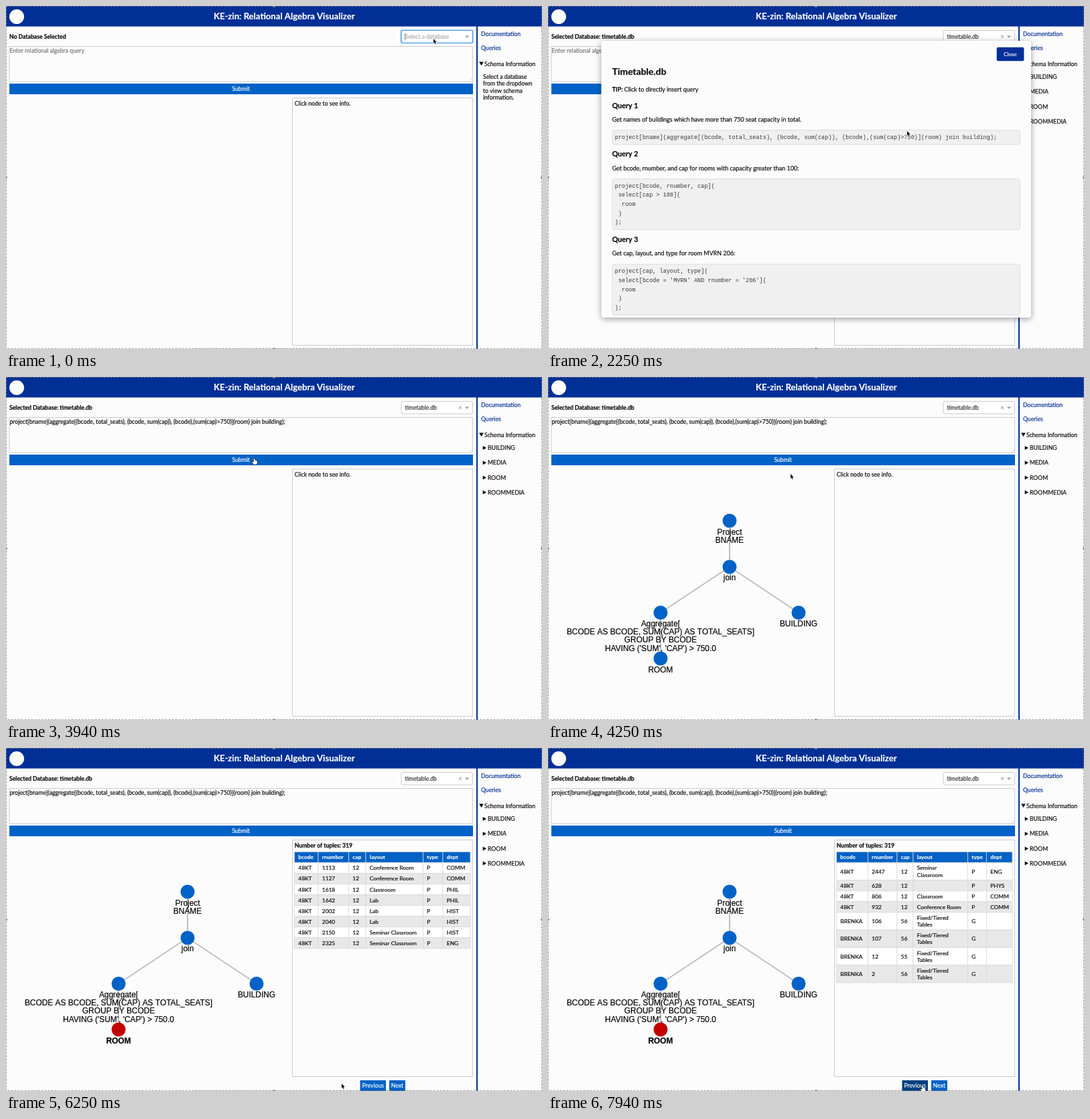
An HTML page with a canvas for the animation above (8000 ms loop, 800 px wide and 513 px high).

```html
<!DOCTYPE html>
<html lang="en">
<head>
<meta charset="utf-8">
<title>Relational Algebra Visualizer</title>
<style>
html, body { margin: 0; width: 100%; height: 100%; overflow: hidden; background: #fcfcfc; }
canvas { display: block; width: 800px; height: 513px; }
</style>
</head>
<body>
<canvas id="stage"></canvas>
<script>
const W = 800, H = 513, LOOP = 8000, STEP = 62.5;
const canvas = document.getElementById('stage');
const c = canvas.getContext('2d');
const ratio = window.devicePixelRatio || 1;
canvas.width = W * ratio;
canvas.height = H * ratio;

const NAVY = '#002f95', BLUE = '#0062c6', DARK = '#003f80', RED = '#c40000';
const PAGE = '#fcfcfc', LINE = '#cccccc', INK = '#0a0a0a';
const BASE = 8.63, MODAL = 8.97;
const LATO = 'Lato, sans-serif';
const MONO = '"Liberation Mono", monospace';
const ARIAL = '"Liberation Sans", sans-serif';
const DB = 'timetable.db';
const QUERY = 'project[bname](aggregate[(bcode, total_seats), (bcode, sum(cap)), (bcode),(sum(cap)>750)](room) join building);';

// Moments of the hard changes, in ms
const AT = { open: 187, pick: 625, blur: 1687, modal: 1750, insert: 2500, close: 3250, tree: 4125, table: 4937, select: 4875, next: 6687 };

// Pointer path: time, x, y, shape used until the next key
const PATH = [
  [0, 638, 49, 'arrow'], [250, 638, 50, 'arrow'], [500, 636, 66, 'arrow'], [625, 636, 68, 'beam'],
  [1000, 633, 98, 'beam'], [1250, 688, 78, 'beam'], [1375, 714, 67, 'hand'], [1625, 722, 62, 'hand'],
  [1750, 722, 62, 'arrow'], [2250, 536, 187, 'arrow'], [2375, 531, 192, 'arrow'], [2560, 531, 192, 'arrow'],
  [3062, 686, 70, 'hand'], [3250, 682, 69, 'arrow'], [3312, 679, 69, 'arrow'], [3375, 665, 76, 'beam'],
  [3812, 390, 118, 'hand'], [4000, 364, 123, 'hand'], [4125, 363, 125, 'hand'], [4200, 362, 136, 'arrow'],
  [4250, 362, 145, 'arrow'], [4687, 167, 418, 'arrow'], [5750, 167, 418, 'arrow'], [6250, 501, 502, 'arrow'],
  [6500, 578, 504, 'hand'], [7375, 582, 504, 'hand'], [7687, 561, 505, 'hand'], [8000, 559, 505, 'hand']
];

const TABLE_HEAD = ['bcode', 'rnumber', 'cap', 'layout', 'type', 'dept'];
const row = (...cells) => cells;
const PAGES = [
  {
    cols: [430.5, 466, 511.5, 537, 622.5, 652, 693],
    rows: [
      row('48KT', '1113', '12', 'Conference Room', 'P', 'COMM'),
      row('48KT', '1127', '12', 'Conference Room', 'P', 'COMM'),
      row('48KT', '1618', '12', 'Classroom', 'P', 'PHIL'),
      row('48KT', '1642', '12', 'Lab', 'P', 'PHIL'),
      row('48KT', '2002', '12', 'Lab', 'P', 'HIST'),
      row('48KT', '2040', '12', 'Lab', 'P', 'HIST'),
      row('48KT', '2150', '12', 'Seminar Classroom', 'P', 'HIST'),
      row('48KT', '2325', '12', 'Seminar Classroom', 'P', 'ENG')
    ]
  },
  {
    cols: [430.5, 477.5, 521, 545, 626.5, 654.5, 693],
    rows: [
      row('48KT', '2447', '12', 'Seminar\nClassroom', 'P', 'ENG'),
      row('48KT', '628', '12', '', 'P', 'PHYS'),
      row('48KT', '806', '12', 'Classroom', 'P', 'COMM'),
      row('48KT', '932', '12', 'Conference Room', 'P', 'COMM'),
      row('BRENKA', '106', '56', 'Fixed/Tiered\nTables', 'G', ''),
      row('BRENKA', '107', '56', 'Fixed/Tiered\nTables', 'G', ''),
      row('BRENKA', '12', '55', 'Fixed/Tiered\nTables', 'G', ''),
      row('BRENKA', '2', '56', 'Fixed/Tiered\nTables', 'G', '')
    ]
  }
];

// A hairline outline gives proportional text the weight of smoothed screen type
function text(str, x, y, { size = BASE, color = INK, bold = false, font = LATO, align = 'left' } = {}) {
  c.font = `${bold ? 'bold ' : ''}${size}px ${font}`;
  c.fillStyle = c.strokeStyle = color;
  c.textAlign = align;
  c.fillText(str, x, y);
  if (font === MONO) return;
  c.lineWidth = 0.18;
  c.strokeText(str, x, y);
}

function fill(x, y, w, h, color) {
  c.fillStyle = color;
  c.fillRect(x, y, w, h);
}

function box(x, y, w, h, radius, fillColor, strokeColor, width = 1) {
  c.beginPath();
  c.roundRect(x, y, w, h, radius);
  if (fillColor) { c.fillStyle = fillColor; c.fill(); }
  if (strokeColor) { c.strokeStyle = strokeColor; c.lineWidth = width; c.stroke(); }
}

function poly(points, color, outline) {
  c.beginPath();
  points.forEach(([x, y]) => c.lineTo(x, y));
  c.closePath();
  if (outline) { c.strokeStyle = outline; c.lineWidth = 1.2; c.stroke(); }
  c.fillStyle = color;
  c.fill();
}

function disc(x, y, r, color) {
  c.beginPath();
  c.arc(x, y, r, 0, Math.PI * 2);
  c.fillStyle = color;
  c.fill();
}

function segment(x1, y1, x2, y2, color, width) {
  c.beginPath();
  c.moveTo(x1, y1);
  c.lineTo(x2, y2);
  c.strokeStyle = color;
  c.lineWidth = width;
  c.stroke();
}

function drawHeader() {
  fill(0, 0, W, 30.6, NAVY);
  disc(16, 16, 11, '#ffffff');
  text('KE-zin: Relational Algebra Visualizer', 415.3, 20, { size: 13.1, bold: true, color: '#fff', align: 'center' });
}

function drawSelect(t) {
  const picked = t >= AT.pick;
  if (t < AT.blur) {
    box(589.5, 36, 107.5, 19.5, 2.5, null, 'rgba(60,150,255,.25)', 3);
    box(590, 36.5, 106.5, 18.5, 2, '#fff', '#4295ea', 1.2);
  } else {
    box(590, 36.5, 106.5, 18.5, 2, '#fff', LINE);
  }
  if (picked) {
    text(DB, 595.5, 48.7, { color: '#333' });
    text('×', 678, 48.7, { color: '#999', size: 9.5, align: 'center' });
  } else {
    text('Select a database', 595.5, 48.7, { color: '#aaa' });
    segment(595.5, 40.5, 595.5, 51, '#555', 0.7);
  }
  poly([[685, 44.6], [691, 44.6], [688, 47.8]], '#999');
}

function drawMenu() {
  box(590, 55.5, 106.5, 19, [0, 0, 2, 2], '#fff', LINE);
  fill(590.5, 56, 105.5, 18, '#f0f6ff');
  text(DB, 595.5, 68.3, { color: '#333' });
}

function drawSidebar(t) {
  fill(702, 30, 2, H - 30, NAVY);
  text('Documentation', 709, 44.6, { color: NAVY });
  text('Queries', 709, 65.6, { color: NAVY });
  poly([[706.3, 83.5], [712.7, 83.5], [709.5, 89.3]], INK);
  text('Schema Information', 714, 89.5);
  if (t < AT.pick) {
    ['Select a database', 'from the dropdown', 'to view schema', 'information.']
      .forEach((s, i) => text(s, 712, 109 + i * 10.4));
    return;
  }
  ['BUILDING', 'MEDIA', 'ROOM', 'ROOMMEDIA'].forEach((s, i) => {
    const y = 106 + i * 22.2;
    poly([[711.7, y - 3], [717, y], [711.7, y + 3]], INK);
    text(s, 719, y + 3.1);
  });
}

function drawForm(t) {
  text(t < AT.pick ? 'No Database Selected' : 'Selected Database: ' + DB, 5, 49, { bold: true });
  box(5, 60.5, 691.5, 53, 0, null, LINE);
  segment(692, 112.5, 695.5, 109, '#aaa', 0.6);
  if (t < AT.insert) text('Enter relational algebra query', 5.5, 69.6, { color: '#757575' });
  else text(QUERY, 5.5, 69.6);
  fill(5, 116, 692, 16, BLUE);
  text('Submit', 350.7, 127.1, { color: '#fff', align: 'center' });
}

function label(lines, x, y, bold) {
  lines.forEach((s, i) => text(s, x, y + i * 12.2, { size: 11.9, font: ARIAL, bold, align: 'center', color: '#000' }));
}

function drawTree(selected) {
  const top = [271, 215], join = [271, 284], left = [168, 352.5], right = [374, 352.5], leaf = [168, 421];
  [[top, join], [join, left], [join, right], [left, leaf]]
    .forEach(([a, b]) => segment(...a, ...b, '#bfbfbf', 2));
  [top, join, left, right].forEach(p => disc(...p, 10.5, BLUE));
  disc(...leaf, 10.5, selected ? RED : BLUE);
  label(['Project', 'BNAME'], 271, 235.6);
  label(['join'], 271, 304.2);
  label(['BUILDING'], 374, 373);
  label(['Aggregate[', 'BCODE AS BCODE, SUM(CAP) AS TOTAL_SEATS]', 'GROUP BY BCODE', "HAVING ('SUM', 'CAP') > 750.0"], 168, 373);
  label(['ROOM'], 168, 441.6, selected);
}

function drawRow(cells, cols, y, h, background, style) {
  cells.forEach((cell, i) => {
    box(cols[i], y, cols[i + 1] - cols[i], h, 0, background, '#d9d9d9', 0.8);
    const lines = cell.split('\n');
    lines.forEach((s, k) => {
      text(s, cols[i] + 5.8, y + h / 2 + 3 + (k - (lines.length - 1) / 2) * 10.2, { size: 8.4, ...style });
    });
  });
}

function drawTable({ cols, rows }) {
  text('Number of tuples: 319', 430.7, 149, { bold: true });
  drawRow(TABLE_HEAD, cols, 155.3, 16.1, BLUE, { bold: true, color: '#fff' });
  let y = 171.4;
  rows.forEach((cells, n) => {
    const h = cells[3].includes('\n') ? 26.3 : 16.05;
    drawRow(cells, cols, y, h, n % 2 ? '#e8e8e8' : '#fff');
    y += h;
  });
}

function drawButton(name, x, w, hover) {
  fill(x, 497, w, 16, hover ? DARK : BLUE);
  text(name, x + w / 2, 508.3, { color: '#fff', align: 'center' });
}

function drawPanel(t, pointer) {
  const full = t >= AT.table;
  box(427.5, 137.5, 269, full ? 354 : 370, 0, null, LINE);
  if (!full) {
    text('Click node to see info.', 430.7, 149);
    return;
  }
  drawTable(PAGES[t < AT.next ? 0 : 1]);
  const over = (x, w) => pointer.y > 497 && pointer.x >= x && pointer.x <= x + w;
  drawButton('Previous', 528.5, 38.5, over(528.5, 38.5));
  drawButton('Next', 572, 24, over(572, 24));
}

function codeBlock(lines, y, h) {
  box(96, y, 608.5, h, 3, '#f0f0f0', '#dddddd');
  lines.forEach((s, i) => text(s, 99.8, y + 13.2 + i * 13.65, { size: 8.57, font: MONO, color: '#3a3a3a' }));
}

function drawModal() {
  c.save();
  c.shadowColor = 'rgba(0,0,0,.38)';
  c.shadowBlur = 10 * ratio;
  c.shadowOffsetY = 2 * ratio;
  box(79.5, 52, 641.5, 414, 4, PAGE);
  c.restore();
  const heading = (n, y) => text('Query ' + n, 95.7, y, { size: 10.7, bold: true });
  const note = (s, y, x = 95.7) => text(s, x, y, { size: MODAL });
  box(669.7, 61.8, 40.7, 20.4, 2, NAVY);
  text('Close', 690, 75, { size: 8, color: '#fff', align: 'center' });
  text('Timetable.db', 95.7, 103.3, { size: 13.9, bold: true });
  text('TIP:', 95.7, 128.2, { size: MODAL, bold: true });
  note('Click to directly insert query', 128.2, 113.7);
  heading(1, 152.8);
  note('Get names of buildings which have more than 750 seat capacity in total.', 173.2);
  codeBlock([QUERY], 185.8, 21.4);
  heading(2, 225.3);
  note('Get bcode, rnumber, and cap for rooms with capacity greater than 100:', 245.8);
  codeBlock(['project[bcode, rnumber, cap](', ' select[cap > 100](', '  room', ' )', ');'], 258.6, 75.8);
  heading(3, 352.8);
  note('Get cap, layout, and type for room MVRN 206:', 373.3);
  codeBlock(['project[cap, layout, type](', " select[bcode = 'MVRN' AND rnumber = '206'](", '  room', ' )', ');'], 386.2, 75.8);
}

function pointerAt(t) {
  let i = 0;
  while (i < PATH.length - 2 && PATH[i + 1][0] <= t) i++;
  const [t0, x0, y0, shape] = PATH[i], [t1, x1, y1] = PATH[i + 1];
  const p = (t - t0) / (t1 - t0);
  const e = p * p * (3 - 2 * p);
  return { x: x0 + (x1 - x0) * e, y: y0 + (y1 - y0) * e, shape };
}

function drawPointer({ x, y, shape }) {
  c.save();
  c.translate(x, y);
  if (shape === 'beam') {
    segment(0, -3.5, 0, 3.5, '#222', 0.9);
    segment(-2, -4, 2, -4, '#222', 0.8);
    segment(-2, 4, 2, 4, '#222', 0.8);
  } else if (shape === 'hand') {
    poly([[-1, 0], [0.5, 0], [0.8, 3], [4, 3.8], [4.3, 6], [3.4, 9], [-1, 9], [-3.4, 5.5], [-2.6, 4.8], [-1, 6]], '#fff', '#111');
  } else {
    poly([[0, 0], [0, 6.8], [1.5, 5.4], [2.6, 7.9], [3.7, 7.4], [2.7, 5], [4.7, 4.9]], '#000', '#fff');
  }
  c.restore();
}

function drawFrameEdge() {
  c.save();
  fill(280, 511, 350, 2, 'rgba(0,0,0,.05)');
  c.setLineDash([3, 2]);
  c.strokeStyle = 'rgba(135,135,135,.8)';
  c.lineWidth = 1;
  c.strokeRect(0.5, 0.5, W - 1, H - 1);
  c.restore();
  [[400, 0], [400, H], [0, 256.5], [W, 256.5]].forEach(([x, y]) => disc(x, y, 2, '#909090'));
}

function draw(t) {
  const pointer = pointerAt(t);
  c.setTransform(ratio, 0, 0, ratio, 0, 0);
  fill(0, 0, W, H, PAGE);
  drawHeader();
  drawSidebar(t);
  drawForm(t);
  drawSelect(t);
  if (t >= AT.open && t < AT.pick) drawMenu();
  if (t >= AT.tree) drawTree(t >= AT.select);
  drawPanel(t, pointer);
  if (t >= AT.modal && t < AT.close) drawModal();
  drawFrameEdge();
  drawPointer(pointer);
}

const start = performance.now();
function tick() {
  const t = (performance.now() - start) % LOOP;
  draw(Math.min(Math.floor((t + 5) / STEP) * STEP, LOOP - STEP));
  requestAnimationFrame(tick);
}
tick();
</script>
</body>
</html>
```
